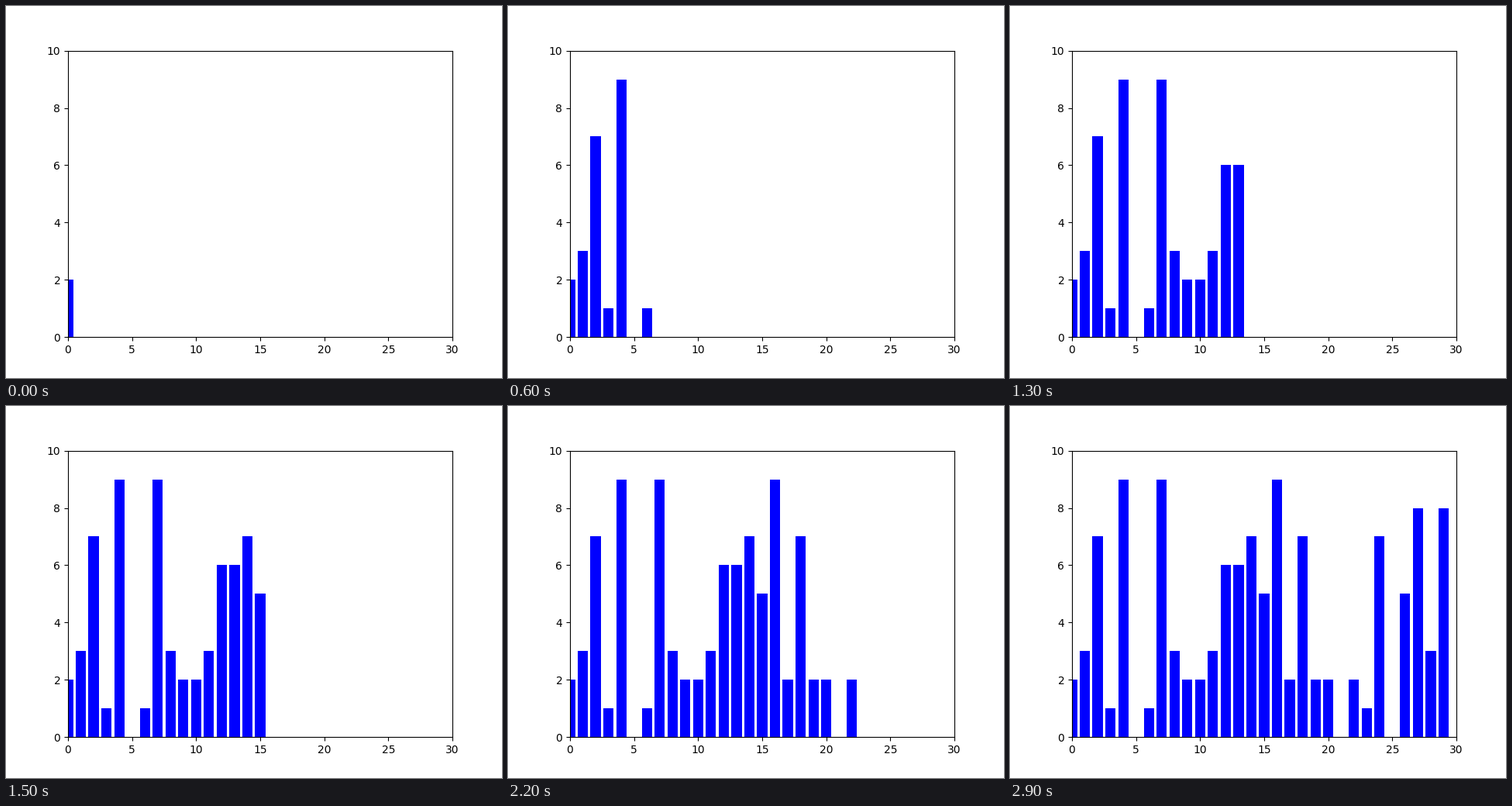
Animation, 640 px wide and 480 px high, one loop 3000 ms. Source, as a matplotlib script:

```python
import matplotlib.pyplot as plt
from matplotlib.animation import FuncAnimation

COUNT = 30
# Key bars that stand out from the wave: height -> positions
KEY_BARS = {9: (4, 7, 16), 8: (27, 29), 7: (2, 14, 18, 24),
            6: (12, 13), 5: (15, 26), 0: (21,)}


def wave(i):
    """Low zigzag between 0 and 3 that repeats every ten bars."""
    return 3 - abs(abs(i % 10 - 4.5) - 3.5)


heights = [wave(i) for i in range(COUNT)]
for level, places in KEY_BARS.items():
    for i in places:
        heights[i] = level

fig, ax = plt.subplots(figsize=(6.4, 4.8), dpi=100)
ax.set_xlim(0, COUNT)
ax.set_ylim(0, 10)
bars = ax.bar(range(COUNT), heights, width=0.8, color="blue")


def update(step):
    """Show every bar up to and including the current one."""
    for i, bar in enumerate(bars):
        bar.set_visible(i <= step and heights[i] > 0)
    return bars.patches


anim = FuncAnimation(fig, update, frames=COUNT, interval=100,
                     repeat=True, repeat_delay=0, blit=False)
plt.show()
```
